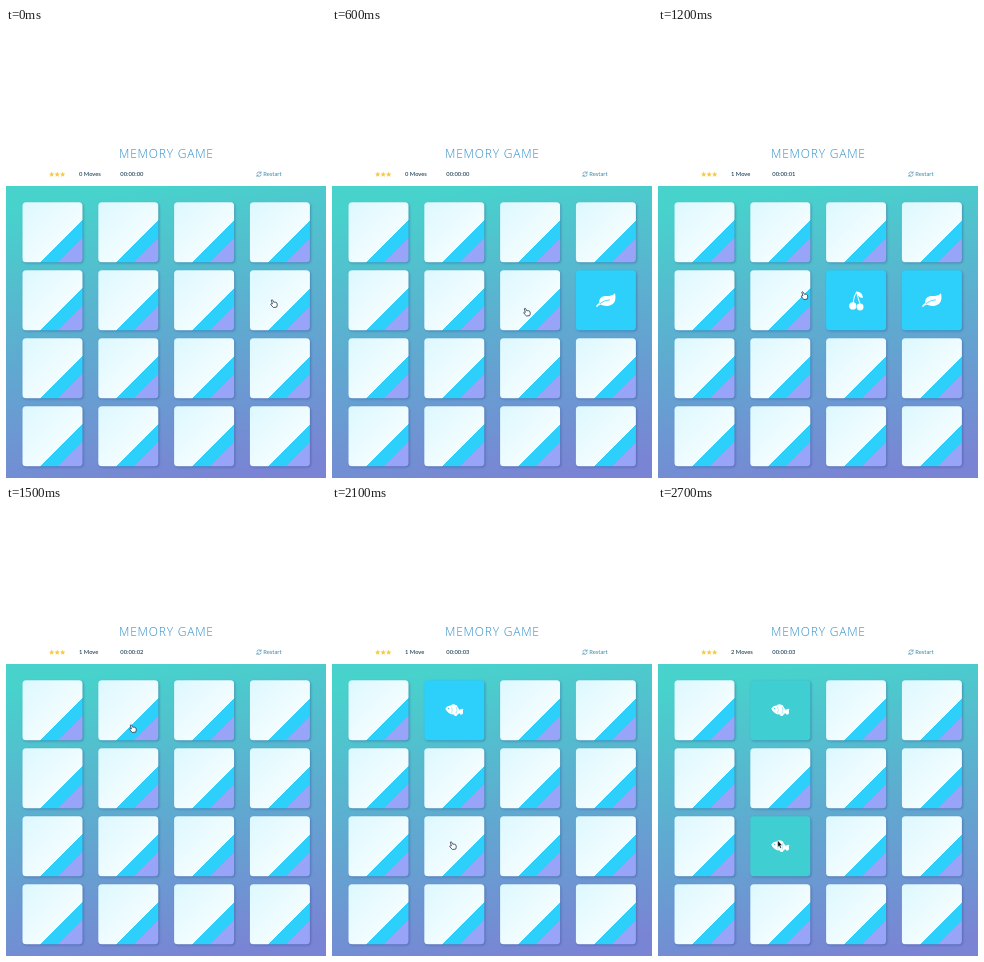
Write an HTML page that moves like this. It is 320 by 450 pixels and loops after 3 s.

```html
<!DOCTYPE html>
<html lang="en">
<head>
<meta charset="utf-8">
<title>Memory game</title>
<style>
  html, body { margin: 0; width: 100%; height: 100%; overflow: hidden; background: #fff; }
  svg { display: block; width: 100%; height: 100%; }
  .info { font: 500 5.8px Lato, sans-serif; fill: #17384f; }
  .title { font: 300 12px "Open Sans", sans-serif; letter-spacing: .8px; fill: #2f8fcb; }
  .card { filter: drop-shadow(1px 1.5px 1.2px rgba(30, 50, 120, .35)); }
</style>
</head>
<body>
<svg viewBox="0 0 320 450">
  <defs>
    <linearGradient id="sea" gradientUnits="userSpaceOnUse" x1="135" y1="158" x2="185" y2="450">
      <stop offset="0" stop-color="#47d3cc"/>
      <stop offset=".5" stop-color="#5eabd0"/>
      <stop offset="1" stop-color="#7985d4"/>
    </linearGradient>
    <linearGradient id="back" x1="0" y1="0" x2="1" y2="1">
      <stop offset="0" stop-color="#dcf8ff"/>
      <stop offset=".65" stop-color="#f3fdff"/>
      <stop offset=".65" stop-color="#2dd0fb"/>
      <stop offset=".8" stop-color="#2dd0fb"/>
      <stop offset=".8" stop-color="#97a4f8"/>
      <stop offset="1" stop-color="#97a4f8"/>
    </linearGradient>

    <g id="leaf">
      <path d="M9 -7C10.5 -2 9.5 5 2 5.6C-1 5.9 -3.500 5.200 -5 4.200Q-7.500 4.800 -8.800 6.700L-10 6Q-8.600 3.600 -6.600 2.600C-7.200 -2 -4 -4.300 0 -4.300C4 -4.300 7 -4.500 9 -7Z" fill="#fff"/>
      <path d="M-6 3.400Q-2 -.2 4 -.5" fill="none" stroke="#2dd0fb" stroke-width=".8"/>
    </g>

    <g id="cherry" fill="#fff">
      <circle cx="-3.300" cy="5.600" r="3.600"/>
      <circle cx="4" cy="6.700" r="3.400"/>
      <path d="M-3 3Q-2.500 -4 .5 -8.500Q2 -2 4 4" fill="none" stroke="#fff" stroke-width="1"/>
      <path d="M.3 -8.800Q6.500 -8.800 6.800 -2.300Q1.400 -2.500 .3 -8.800Z"/>
    </g>

    <g id="fish">
      <path d="M-9 -1.500Q-7 -4.700 -3.500 -4.700Q-2 -6.500 .5 -5.800Q3.300 -5.300 3.500 -2.700Q4.700 -1.300 5.400 -.4Q7.500 -2.300 9 -1.300Q8.300 .5 8.800 2.700Q8.500 4.300 6.600 4.400Q5.400 3.700 5 2.600Q4 3.600 3.300 4.200Q2.800 6.100 .4 5.700L-.4 4.300Q-6.300 4.200 -9 -1.500Z" fill="#fff"/>
      <path d="M-3 -3.800Q-1.200 -.5 -2.700 2.800M2 -3.300Q3.300 .3 1.600 3.600" fill="none" stroke="#8fe3f4" stroke-width=".7"/>
      <circle cx="-5.700" cy="-1.800" r=".7" fill="#4abfd8"/>
    </g>

    <path id="hand" d="M-2.700 -3.300Q-1.900 -4.300 -1.200 -3.200L-.3 -1.300Q2.300 -1.700 3 -.4Q3.700 1.700 2.700 3.600L-.5 4Q-2.500 2.500 -3.300 .7Q-2.900 -.2 -1.600 .4Z"
      fill="#fff" stroke="#26364a" stroke-width=".8" stroke-linejoin="round"/>
    <path id="arrow" d="M-1.700 -4L-1.700 2.400L-.3 1.300L.7 3.700L1.800 3.200L.8 1L2.500 .8Z" fill="#111" stroke="#fff" stroke-width=".3"/>
    <path id="star" d="M0 -2.700L.8 -.9L2.600 -.7L1.300 .6L1.600 2.400L0 1.500L-1.600 2.400L-1.300 .6L-2.600 -.7L-.8 -.9Z" fill="#f6cb4a"/>
  </defs>

  <rect width="320" height="450" fill="#fff"/>
  <rect y="158" width="320" height="292" fill="url(#sea)"/>
  <text class="title" x="160.400" y="129.700" text-anchor="middle">MEMORY GAME</text>
  <use href="#star" x="45.700" y="146.300"/>
  <use href="#star" x="51.200" y="146.300"/>
  <use href="#star" x="56.700" y="146.300"/>
  <text class="info" id="moves" x="73" y="148.200"></text>
  <text class="info" id="clock" x="114.300" y="148.200"></text>
  <g fill="none" stroke="#458fb0" stroke-width=".7">
    <path d="M250.800 145.800A2.200 2.200 0 0 1 254.600 144.700M255.200 146.500A2.200 2.200 0 0 1 251.400 147.600"/>
    <path d="M255.100 143.400V145.200H253.300M250.900 148.900V147.100H252.700"/>
  </g>
  <text class="info" x="257.300" y="148.200" style="fill:#458fb0">Restart</text>
  <g id="board"></g>
  <use id="pointer"/>
</svg>

<script>
const STEP = 300, LOOP = 3000;
const $ = id => document.getElementById(id);

const leaf = [7, 'leaf'], cherry = [6, 'cherry'], fish = [1, 'fish'], twin = [9, 'fish'];

// One state per step: pointer x, y, moves, seconds, open cards
const states = [
  [268, 275.5, 0, 0, []],
  [268, 275.5, 0, 0, [leaf]],
  [195, 284, 0, 0, [leaf]],
  [195, 284, 1, 1, [leaf, cherry]],
  [146.5, 267.500, 1, 1, [leaf, cherry]],
  [127, 222.500, 1, 2, []],
  [127, 222.500, 1, 2, [fish]],
  [121, 339.500, 1, 3, [fish]],
  [121.5, 338.500, 2, 3, [fish, twin]],
  [121.5, 338.500, 2, 3, [fish, twin]]
];

const cardX = i => 16.5 + 75.8 * (i % 4);
const cardY = i => 174.3 + 68 * Math.floor(i / 4);

function cardMarkup(i, open, matched) {
  const x = cardX(i), y = cardY(i);
  const icon = open.find(c => c[0] === i);
  const fill = !icon ? 'url(#back)' : matched ? '#3fcfd2' : '#2dd0fb';
  return `<rect class="card" x="${x}" y="${y}" width="60" height="60" rx="3.5" fill="${fill}"/>` +
    (icon ? `<use href="#${icon[1]}" x="${x + 30}" y="${y + 30}"/>` : '');
}

let shown = -1;
function draw(now) {
  const k = Math.floor(now % LOOP / STEP);
  if (k !== shown) {
    shown = k;
    const [x, y, moves, seconds, open] = states[k];
    const matched = moves === 2;
    $('moves').textContent = `${moves} Move${moves === 1 ? '' : 's'}`;
    $('clock').textContent = `00:00:0${seconds}`;
    $('board').innerHTML = Array.from({ length: 16 }, (_, i) => cardMarkup(i, open, matched)).join('');
    const pointer = $('pointer');
    pointer.setAttribute('href', matched ? '#arrow' : '#hand');
    pointer.setAttribute('x', x);
    pointer.setAttribute('y', y);
  }
}

let start;
function tick(now) {
  start ??= now;
  draw(now - start);
  requestAnimationFrame(tick);
}
draw(0);
requestAnimationFrame(tick);
</script>
</body>
</html>
```
